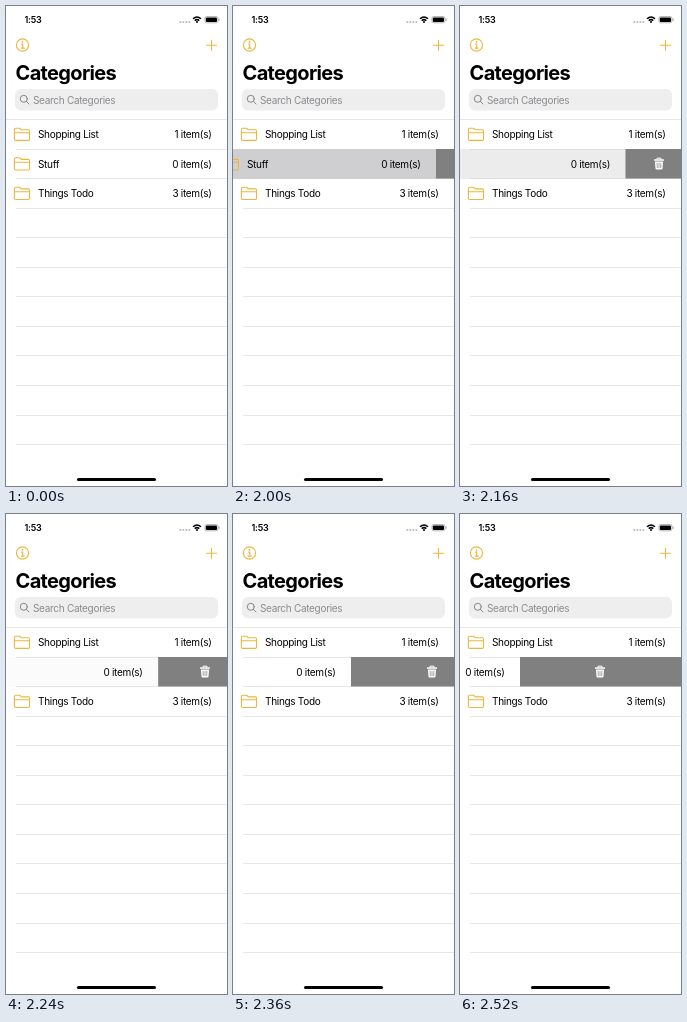
An HTML page that plays this animation: 221 by 480 pixels, repeating every 2560 ms.

```html
<!DOCTYPE html>
<html lang="en">
<head>
<meta charset="utf-8">
<title>Categories</title>
<style>
  html, body { margin: 0; width: 100%; height: 100%; overflow: hidden; background: #fff; }
  svg { display: block; width: 100%; height: 100%; }
  text { font: 10px Inter, "Liberation Sans", sans-serif; letter-spacing: -0.03em; }
  .title { font-size: 20px; font-weight: 700; letter-spacing: -0.033em; }
  .clock { font-size: 9px; font-weight: 600; }
  .hint { fill: #8b8b90; }
  .end { text-anchor: end; }
  .gold { fill: none; stroke: #ecb73f; stroke-width: 1.1; stroke-linejoin: round; stroke-linecap: round; }
  .grey { fill: none; stroke: #85858a; stroke-linecap: round; }
  .wifi { fill: none; stroke: #000; stroke-width: 1.5; }
</style>
</head>
<body>
<svg viewBox="0 0 221 480">
  <defs>
    <path id="folder" class="gold" d="M8.4 133.2V123.4q0-1.2 1.2-1.2h3.6q.7 0 1.2.6l.8 1h7.1q1.2 0 1.2 1.2v8.2q0 1.2-1.2 1.2H9.6q-1.2 0-1.2-1.2ZM8.4 126.7H23.5"/>
  </defs>

  <!-- Status bar -->
  <text class="clock" x="18.5" y="17">1:53</text>
  <path d="M173.5 16h11" stroke="#aaa" stroke-width="1.5" stroke-dasharray="1.7 1.3"/>
  <path class="wifi" d="M187 12.7q4-3.5 8 0M188.7 14.6q2.3-2 4.6 0"/>
  <circle cx="191" cy="16.1" r="1"/>
  <rect x="198.9" y="10.5" width="13" height="6.3" rx="1.8" fill="none" stroke="#999" stroke-width=".7"/>
  <rect x="199.8" y="11.4" width="11.2" height="4.5" rx="1"/>
  <path d="M213 12.5v2.3" stroke="#999"/>

  <!-- Navigation -->
  <circle class="gold" cx="16.5" cy="39" r="6.1"/>
  <path class="gold" d="M15.6 38.1h1.1v4M15.2 42.1h3"/>
  <circle cx="16.5" cy="35.9" r=".85" fill="#ecb73f"/>
  <path class="gold" d="M200.5 39.2h10M205.5 34.2v10"/>
  <text class="title" x="9.5" y="73.5">Categories</text>
  <rect x="9" y="83" width="203" height="21.5" rx="6" fill="#eeeeef"/>
  <circle class="grey" cx="17.8" cy="92.8" r="3.5"/>
  <path class="grey" d="M20.4 95.4l2.6 2.6"/>
  <text class="hint" x="27" y="97.7">Search Categories</text>

  <!-- List -->
  <g id="lines" fill="#e7e7e8"></g>
  <rect id="highlight" y="143" width="221" height="30" fill="#cfcfd1"/>
  <g id="rows"></g>
  <rect id="action" y="143" width="221" height="29.5" fill="#808080"/>
  <g id="trash">
    <path d="M-2 153.4v-1.2h4v1.2" fill="none" stroke="#fff"/>
    <rect x="-5" y="153.3" width="10" height="1.5" rx=".6" fill="#fff"/>
    <path d="M-4.1 155.4h8.2l-.6 7.2q-.1 1-1.1 1h-4.8q-1 0-1.1-1Z" fill="#fff"/>
    <path d="M-1.9 156.8l.2 5.2M0 156.8v5.2M1.9 156.8l-.2 5.2" stroke="#808080" stroke-width=".7"/>
  </g>
  <rect x="71" y="472" width="79" height="3" rx="1.5"/>
</svg>
<script>
const WIDTH = 221, LOOP = 2560, STEP = 40, ROW_HEIGHT = 29.55;
const byId = id => document.getElementById(id);
const categories = [["Shopping List", 1], ["Stuff", 0], ["Things Todo", 3]];

byId("lines").innerHTML = Array.from({ length: 12 }, (_, i) => {
  const inset = i ? 10 : 0;
  return `<rect x="${inset}" y="${Math.round(113 + i * ROW_HEIGHT)}" width="${WIDTH - inset}" height="1"/>`;
}).join("");

byId("rows").innerHTML = categories.map(([name, count], i) =>
  `<g><g transform="translate(0 ${i * ROW_HEIGHT})"><use href="#folder"/>
   <text x="32" y="132">${name}</text>
   <text class="end" x="205.5" y="132">${count} item(s)</text></g></g>`).join("");

const swipedRow = byId("rows").children[1];

// Each track is a list of [time, value] points.
const swipe = [[1960, 0], [2000, 18], [2040, 36], [2080, 47], [2160, 55.5],
               [2280, 75.5], [2360, 103], [2520, 161]];
const fade = [[2040, 1], [2080, 0.82], [2160, 0.4], [2260, 0]];
const iconShift = [[2440, 0], [2480, 11], [2520, 59]];

function valueAt(track, time) {
  const next = track.findIndex(([t]) => t > time);
  if (next === 0) return track[0][1];
  if (next < 0) return track[track.length - 1][1];
  const [t0, v0] = track[next - 1], [t1, v1] = track[next];
  return v0 + (v1 - v0) * (time - t0) / (t1 - t0);
}

function draw(now) {
  const time = Math.floor((now % LOOP) / STEP) * STEP;
  const offset = valueAt(swipe, time);
  const edge = WIDTH - offset;
  const iconX = Math.max(199, edge + 25) - valueAt(iconShift, time);
  swipedRow.setAttribute("transform", `translate(${-offset} 0)`);
  byId("highlight").setAttribute("opacity", time < 1960 ? 0 : valueAt(fade, time));
  byId("action").setAttribute("x", edge);
  byId("trash").setAttribute("transform", `translate(${iconX} 0)`);
}

const start = performance.now();
function tick() {
  draw(performance.now() - start);
  requestAnimationFrame(tick);
}
tick();
</script>
</body>
</html>
```
